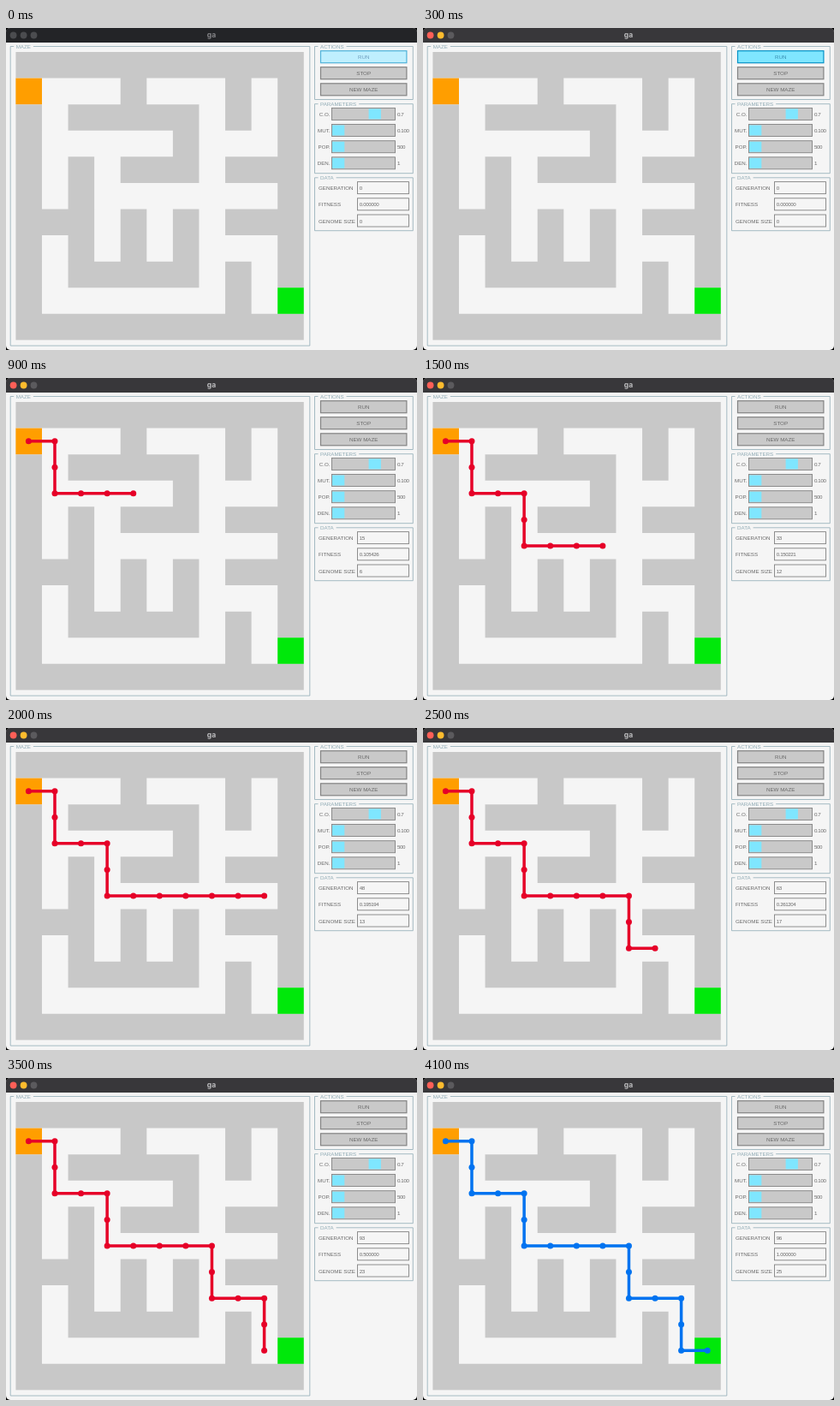
An HTML page that plays this animation: 480x376 px, repeating every 4400 ms.

```html
<!DOCTYPE html>
<html lang="en">
<head>
<meta charset="utf-8">
<title>ga</title>
<style>
  html, body { margin: 0; width: 100%; height: 100%; overflow: hidden; background: #000; }
  svg { display: block; width: 100vw; height: 100vh; }
  text { font: 6.2px "Liberation Sans", sans-serif; fill: #686868; }
  .num { letter-spacing: -.4px; }
  .legend { fill: #90abb5; }
  .title { font: 700 8.5px Inter, sans-serif; }
  .frame { fill: none; stroke: #90abb5; stroke-width: .8; }
  .control { fill: #c9c9c9; stroke: #838383; }
  .field { fill: #f5f5f5; stroke: #838383; stroke-width: .9; }
</style>
</head>
<body>
<script>
const LOOP = 4400, STEP = 100, LAST_GEN = 96;
const CELL = 30.58, LEFT = 11.4, TOP = 28;
const MAZE = [
  '###########',
  '....#...#.#',
  '#.#####.#.#',
  '#.....#...#',
  '#.#.###.###',
  '#.#.......#',
  '###.#.#.###',
  '#.#.#.#...#',
  '#.#####.#.#',
  '#.......#..',
  '###########',
];
const START = [0, 1], GOAL = [10, 9];

// Best individual: [first generation, column, row, genome size]
const BEST = [
  [3, 2, 1, 2], [6, 3, 1, 3], [9, 2, 3, 4], [12, 3, 3, 5], [15, 4, 3, 6],
  [18, 5, 3, 7], [24, 4, 5, 9], [27, 5, 5, 10], [33, 6, 5, 12], [39, 7, 5, 12],
  [42, 8, 5, 12], [45, 9, 5, 13], [57, 7, 7, 15], [63, 8, 7, 17], [69, 9, 7, 18],
  [75, 9, 8, 20], [90, 9, 9, 23], [LAST_GEN, ...GOAL, 25],
];

// Button looks: [fill, border, text]
const NORMAL = ['#c9c9c9', '#838383', '#686868'];
const HOVER = ['#bfeffe', '#4fb2d9', '#6c9bbc'];
const PRESSED = ['#7fe6ff', '#0492c7', '#368baf'];

function add(parent, tag, attrs, content = '') {
  const node = document.createElementNS('http://www.w3.org/2000/svg', tag);
  for (const key in attrs) node.setAttribute(key, attrs[key]);
  node.textContent = content;
  parent.append(node);
  return node;
}

const svg = add(document.body, 'svg', { viewBox: '0 0 480 376', preserveAspectRatio: 'none' });
const box = (x, y, width, height, attrs) => add(svg, 'rect', { x, y, width, height, ...attrs });
const label = (x, y, content, attrs) => add(svg, 'text', { x, y: y + 2.3, ...attrs }, content);

function group(x, y, right, bottom, name) {
  const text = label(x + 6.5, y - .2, name, { class: 'legend' });
  const gapEnd = x + 9.5 + text.getComputedTextLength();
  add(svg, 'path', { class: 'frame', d: `M${x + 4} ${y}H${x}V${bottom}H${right}V${y}H${gapEnd}` });
}

function button(y, name) {
  return [
    box(367.5, y, 100.4, 14, { class: 'control', 'stroke-width': 1.2 }),
    label(417.7, y + 7, name, { 'text-anchor': 'middle' }),
  ];
}

function slider(y, name, value, handle) {
  box(380.5, y, 74, 14, { class: 'control', 'stroke-width': .9 });
  box(handle, y + 1, 14.3, 12, { fill: '#7fe6ff' });
  label(378.5, y + 7.2, name, { 'text-anchor': 'end' });
  label(457, y + 7.2, value, { class: 'num' });
}

function field(y, name) {
  box(410.5, y, 60, 14, { class: 'field' });
  label(365, y + 7.2, name);
  return label(412.8, y + 7.2, '', { class: 'num' });
}

const cellBox = ([col, row], fill, attrs) =>
  box(LEFT + col * CELL, TOP + row * CELL, CELL, CELL, { fill, ...attrs });
const center = ([col, row]) => [26.4 + col * CELL, 43.1 + row * CELL];

// The maze is a tree, so the first route found is the only one.
function route(from, to, trail = []) {
  const path = [...trail, from];
  if (from + '' === to + '') return path;
  for (const [dx, dy] of [[1, 0], [0, 1], [-1, 0], [0, -1]]) {
    const next = [from[0] + dx, from[1] + dy];
    if (MAZE[next[1]]?.[next[0]] !== '.') continue;
    if (trail.some(cell => cell + '' === next + '')) continue;
    const found = route(next, to, path);
    if (found) return found;
  }
  return null;
}

// Window
box(0, 0, 480, 376, { rx: 5, fill: '#f5f5f5' });
const bar = add(svg, 'path', { d: 'M0 17V5Q0 0 5 0H475Q480 0 480 5V17Z' });
const lights = [8.6, 20.6, 32.5].map(cx => add(svg, 'circle', { cx, cy: 8.5, r: 3.9 }));
const title = label(240, 8.8, 'ga', { class: 'title', 'text-anchor': 'middle' });

// Maze
group(5.2, 21.5, 354.8, 371, 'MAZE');
box(LEFT, TOP, CELL * 11, CELL * 11, { fill: '#c8c8c8' });
let floor = '';
MAZE.forEach((line, row) => {
  for (const run of line.matchAll(/\.+/g)) {
    floor += `M${LEFT + run.index * CELL} ${TOP + row * CELL}h${run[0].length * CELL}v${CELL}h${-run[0].length * CELL}z`;
  }
});
add(svg, 'path', { d: floor, fill: '#f5f5f5' });
cellBox(START, '#ff9e00');
cellBox(GOAL, '#00e80a');

const trace = add(svg, 'g', { 'stroke-width': 3.5 });

// Panels
group(360.5, 21.5, 475.3, 83.5, 'ACTIONS');
const [runBox, runText] = button(26.7, 'RUN');
button(45.7, 'STOP');
button(64.8, 'NEW MAZE');

group(360.5, 88.7, 475.3, 169.7, 'PARAMETERS');
slider(93.4, 'C.O.', '0.7', 423.6);
slider(112.5, 'MUT.', '0.100', 381);
slider(131.7, 'POP.', '500', 381);
slider(150.8, 'DEN.', '1', 381);

group(360.5, 174.8, 475.3, 236.7, 'DATA');
const generation = field(179.6, 'GENERATION');
const fitness = field(198.8, 'FITNESS');
const genomeSize = field(218, 'GENOME SIZE');

function drawTrace(cells, color) {
  trace.replaceChildren();
  if (!cells) return;
  const points = cells.map(center);
  add(trace, 'polyline', { points: points.join(' '), fill: 'none', stroke: color });
  for (const [cx, cy] of points) add(trace, 'circle', { cx, cy, r: 3.5, fill: color });
}

function draw(tick) {
  const active = tick >= 2;
  bar.setAttribute('fill', active ? '#38373a' : '#232427');
  title.style.fill = active ? '#bdbdbf' : '#858588';
  const colors = active ? ['#ff5f57', '#febc2e', '#5b5a5d'] : Array(3).fill('#4b4c4f');
  lights.forEach((light, i) => light.setAttribute('fill', colors[i]));

  const look = tick >= 8 ? NORMAL : tick === 2 || tick === 3 ? PRESSED : HOVER;
  runBox.style.fill = look[0];
  runBox.style.stroke = look[1];
  runText.style.fill = look[2];

  const gen = Math.min(LAST_GEN, Math.max(0, 3 * (tick - 4)));
  const best = BEST.findLast(entry => entry[0] <= gen);
  const end = best?.slice(1, 3);
  const score = end ? 1 / (1 + Math.hypot(GOAL[0] - end[0], GOAL[1] - end[1])) : 0;
  generation.textContent = gen;
  fitness.textContent = score.toFixed(6);
  genomeSize.textContent = best ? best[3] : 0;
  drawTrace(end && route(START, end), score === 1 ? '#0073f0' : '#e60028');
}

const began = performance.now();
let shown = -1;
function play() {
  const tick = Math.floor(((performance.now() - began) % LOOP) / STEP);
  if (tick !== shown) draw(shown = tick);
  requestAnimationFrame(play);
}
play();
</script>
</body>
</html>
```
